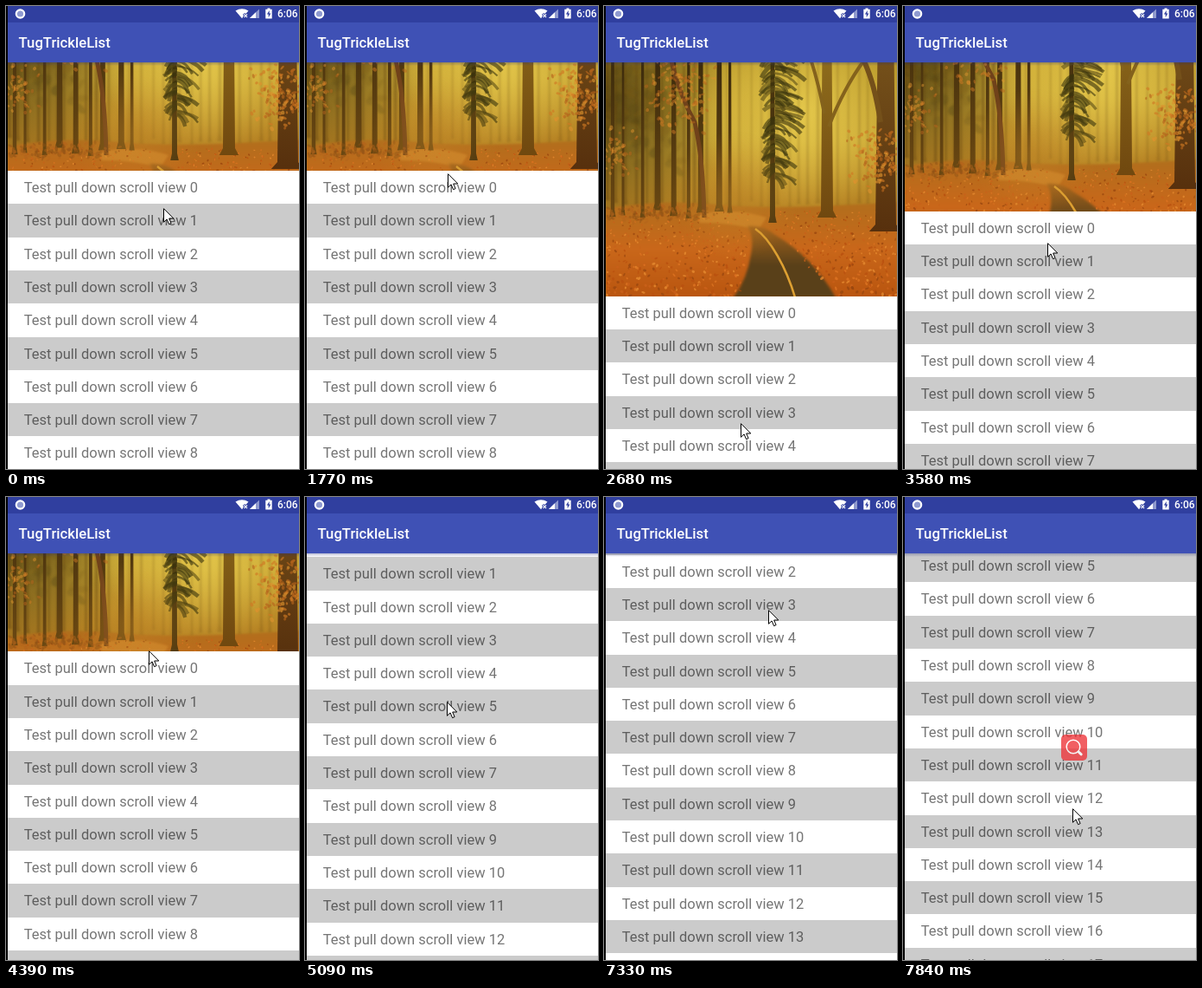
An HTML page with a canvas that plays this animation: 339 px wide and 534 px high, repeating every 7990 ms.

```html
<!DOCTYPE html>
<html lang="en">
<head>
<meta charset="utf-8">
<title>Pull down list</title>
<style>
  html, body { margin: 0; width: 100%; height: 100%; overflow: hidden; background: #000; }
  #stage { position: relative; width: 339px; height: 534px; overflow: hidden; background: #000; font-family: Roboto, "Noto Sans", sans-serif; }
  #page { position: absolute; left: 2px; top: 65px; width: 337px; height: 469px; overflow: hidden; background: #fff; }
  #header { position: absolute; left: 0; top: 0; width: 337px; overflow: hidden; }
  #photo { position: absolute; left: 0; top: 0; }
  #list { position: absolute; left: 0; width: 337px; background: #fff; }
  .row { position: absolute; left: 0; width: 318.3px; padding: 1px 0 0 18.7px; font-size: 16.5px; line-height: 38.3px; color: rgba(0,0,0,.54); white-space: pre; box-sizing: content-box; height: 37.3px; }
  .row:nth-child(even) { background: #cbcbcb; }
  #shade { position: absolute; left: 2px; top: 65px; width: 337px; height: 4px; background: linear-gradient(rgba(40,50,120,.32), rgba(40,50,120,0)); }
  #status { position: absolute; left: 2px; top: 0; width: 337px; height: 19px; background: #303f9f; }
  #bar { position: absolute; left: 2px; top: 19px; width: 337px; height: 46px; background: #3f51b5; color: #fff; font-size: 16.7px; font-weight: 500; line-height: 48px; text-indent: 12.5px; }
  #clock { position: absolute; left: 314px; top: 0; color: #fff; font-size: 12px; font-weight: 500; line-height: 19px; }
  svg { position: absolute; left: 0; top: 0; overflow: visible; }
</style>
</head>
<body>
<div id="stage">
  <div id="page">
    <div id="header"><canvas id="photo" width="337" height="272"></canvas></div>
    <div id="list"></div>
  </div>
  <div id="shade"></div>
  <div id="status"></div>
  <div id="bar">TugTrickleList</div>
  <svg width="339" height="19">
    <circle cx="16.5" cy="9" r="4.7" fill="#8f9ad0" stroke="#fff" stroke-width="2.2"/>
    <path d="M265.5 5.5Q273 .8 280.5 5.5L273 14.3Z" fill="#fff"/>
    <path d="M275 9l4.5 4.5M279.5 9l-4.5 4.5" stroke="#303f9f" stroke-width="3"/>
    <path d="M275.5 9.5l3.6 3.6M279.1 9.5l-3.6 3.6" stroke="#fff" stroke-width="1.1"/>
    <path d="M293 3.5V14H282Z" fill="#8f99cd"/>
    <path d="M289 7.3V14H282Z" fill="#fff"/>
    <path d="M302.5 2.5h3v1.3h2.2v10.7h-7.4V3.8h2.2Z" fill="#fff"/>
    <path d="M304.8 5l-2.9 4.6h1.8v3.6l2.7-4.7h-1.8Z" fill="#303f9f"/>
  </svg>
  <div id="clock">6:06</div>
  <svg id="popup" width="30" height="30">
    <rect width="30" height="30" rx="5" fill="#ee3338"/>
    <g fill="none" stroke="#fff" stroke-linecap="round">
      <circle cx="14" cy="14" r="7.8" stroke-width="1.5"/>
      <path d="M20.2 20l3 2.8" stroke-width="3"/>
    </g>
  </svg>
  <svg id="cursor" width="13" height="20">
    <path d="M.5 .7V16.3L4.1 12.9L6.6 18.7L9.1 17.6L6.7 12H11.8Z" fill="#fff" stroke="#000"/>
  </svg>
</div>
<script>
const $ = id => document.getElementById(id);
const LOOP = 7990, STEP = 133, LEAD = 15;
const REST = 125, PITCH = 38.3, ROWS = 22, PHOTO_W = 337, PHOTO_H = 272;

const flow = f => f;
const easeIn = f => f * f;
const easeOut = f => 1 - (1 - f) ** 3;
const easeBoth = f => f < .5 ? 4 * f ** 3 : 1 - 4 * (1 - f) ** 3;

// Each gesture ends at a step with the pointer at x, y.
// list: offset of the rows, positive when pulled and negative when scrolled.
const GESTURES = [
  { end: 0, x: 182, y: 233, list: 0, ease: flow },
  { end: 4, x: 220, y: 480, list: 0, ease: easeOut },
  { end: 8, x: 162, y: 327, list: 0, ease: flow },
  { end: 13, x: 165, y: 193, list: 0, ease: easeOut },
  { end: 20, x: 158, y: 481, list: 144.7, ease: easeBoth },
  { end: 22, x: 158, y: 482, list: 144.7, ease: flow },
  { end: 27, x: 167, y: 273, list: 46.8, ease: flow },
  { end: 32, x: 165, y: 188, list: 0, ease: easeOut },
  { end: 35, x: 165, y: 85, list: -105, ease: easeIn },
  { end: 38, x: 164, y: 236, list: -159.1, ease: easeOut },
  { end: 42, x: 164, y: 236, list: -159.1, ease: flow },
  { end: 45, x: 152, y: 448, list: 16, ease: flow },
  { end: 47, x: 152, y: 430, list: .3, ease: easeOut },
  { end: 48, x: 153, y: 460, list: 0, ease: flow },
  { end: 51, x: 165, y: 329, list: 0, ease: flow },
  { end: 55, x: 190, y: 130, list: -200, ease: flow },
  { end: 59, x: 196, y: 359, list: -321.4, ease: easeOut }
];

const POPUPS = [
  { from: 47, to: 49, x: 151, y: 376, alpha: .92 },
  { from: 59, to: 61, x: 183, y: 274, alpha: .78 }
];

function pose(step) {
  const i = GESTURES.findIndex(g => g.end >= step);
  if (i < 0) return GESTURES.at(-1);
  if (i === 0) return GESTURES[0];
  const a = GESTURES[i - 1], b = GESTURES[i];
  const f = b.ease((step - a.end) / (b.end - a.end));
  const mix = key => a[key] + (b[key] - a[key]) * f;
  return { x: mix('x'), y: mix('y'), list: mix('list') };
}

// A soft autumn wood: haze, trunks, one conifer, a road and fallen leaves.
function paintForest() {
  const c = $('photo').getContext('2d');
  let seed = 7;
  const rnd = (lo = 0, hi = 1) => {
    seed = seed * 16807 % 2147483647;
    return lo + (hi - lo) * seed / 2147483647;
  };

  function fade(top, bottom, colors) {
    const g = c.createLinearGradient(0, top, 0, bottom);
    colors.forEach((color, i) => g.addColorStop(i / (colors.length - 1), color));
    return g;
  }
  function glow(x, y, r, color) {
    const g = c.createRadialGradient(x, y, 0, x, y, r);
    g.addColorStop(0, color);
    g.addColorStop(1, color.slice(0, 7) + '00');
    c.fillStyle = g;
    c.fillRect(0, 0, PHOTO_W, PHOTO_H);
  }
  function fill(path, style) {
    c.fillStyle = style;
    c.fill(new Path2D(path));
  }
  function line(path, width, style) {
    c.strokeStyle = style;
    c.lineWidth = width;
    c.stroke(new Path2D(path));
  }
  function leaves(n, x, y, w, h, size, colors, alpha) {
    c.globalAlpha = alpha;
    for (let i = 0; i < n; i++) {
      c.fillStyle = colors[Math.floor(rnd(0, colors.length))];
      c.beginPath();
      // the sum of two draws thins the cloud toward its edge
      c.ellipse(x + w * (rnd() + rnd()) / 2, y + h * (rnd() + rnd()) / 2, rnd(.5, 1) * size, rnd(.3, .7) * size, rnd(0, 3), 0, 7);
      c.fill();
    }
    c.globalAlpha = 1;
  }
  function trunk(x, base, w, style) {
    fill(`M${x - w * .4} 0H${x + w * .4}L${x + w * .5} ${base - 8}L${x + w * .8} ${base}H${x - w * .8}L${x - w * .5} ${base - 8}Z`, style);
  }

  c.fillStyle = fade(0, 180, ['#b8982a', '#c9a534', '#b27b20']);
  c.fillRect(0, 0, PHOTO_W, PHOTO_H);
  glow(0, 50, 150, '#4a390ee0');
  glow(225, 60, 120, '#e8cc4ee8');
  glow(150, 60, 70, '#d6b53caa');

  // wood in the mist
  c.filter = 'blur(1px)';
  for (let x = 2; x < PHOTO_W; x += rnd(7, 15)) {
    c.globalAlpha = x < 130 ? .4 : .2;
    trunk(x, rnd(160, 176), rnd(1.5, 4), '#5f430f');
  }
  c.globalAlpha = 1;
  leaves(110, -30, -20, 130, 150, 9, ['#4d3e10', '#64501a', '#7b5a18'], .22);

  // ground
  fill('M0 170Q60 158 130 165T337 162V272H0Z', fade(160, 272, ['#b06f1d', '#c9671a', '#b9550f']));
  fill('M108 176Q150 168 186 180L176 195Q150 186 108 186Z', '#cb8028');
  c.filter = 'blur(1.5px)';
  fill('M164 190Q182 188 196 200Q240 226 266 272H148Q164 250 168 222Q172 202 164 190Z', fade(188, 235, ['#a8651c', '#594019']));
  c.filter = 'blur(.5px)';
  line('M173 193C190 204 209 238 219 272', 2.6, '#dda032');

  const litter = ['#dc7322', '#b9500f', '#9a470f', '#e58a30', '#c9601a'];
  for (let y = 172; y < PHOTO_H; y += 4) {
    const near = (y - 160) / 110;
    const bend = Math.max(0, y - 192);
    for (let i = 0; i < 36; i++) {
      const x = rnd(0, PHOTO_W);
      if (x > 165 - bend * .12 && x < 194 + bend * .92) continue;
      leaves(1, x, y, 4, 4, 1.2 + near * 1.5, litter, .8);
    }
  }

  // near trunks
  for (let x = 8; x < 160; x += rnd(12, 26))
    trunk(x, rnd(170, 182), rnd(3, 7), fade(0, 180, ['#3c2b0c', '#6b4812']));
  line('M76 0Q86 40 103 70Q113 115 114 180', 5, '#70421a');
  trunk(256, 180, 14, fade(0, 180, ['#8d6b1c', '#70480f']));
  line('M258 75Q276 30 298 0M253 60Q246 25 238 0', 4, '#84621c');
  trunk(324, 196, 24, fade(0, 196, ['#74501a', '#57300d']));
  line('M318 70Q311 25 299 0', 6, '#74501a');

  // conifer with drooping branches
  trunk(193, 186, 6, '#49340e');
  c.globalAlpha = .6;
  for (let y = -12; y < 135; y += 1.6) {
    const side = rnd() < .42 ? -1 : 1;
    const reach = rnd(10, side < 0 ? 20 : 38) * (1 - .25 * y / 135);
    line(`M196 ${y}q${side * reach * .6} 1 ${side * reach} ${rnd(6, 16)}`, rnd(2, 5), rnd() < .6 ? '#39330d' : '#5a4c16');
  }
  c.globalAlpha = 1;

  const gold = ['#cf7a24', '#b5641c', '#dc922e'];
  leaves(150, 45, -15, 85, 100, 3.2, gold, .5);
  leaves(60, -20, 70, 60, 70, 3, gold, .5);
  leaves(150, 275, 70, 85, 85, 3.2, gold, .65);
  leaves(150, -10, 164, 150, 22, 3, ['#8f5216', '#b4641c'], .45);
  glow(150, 155, 75, '#c68a2a66');
}

function buildList() {
  for (let i = 0; i < ROWS; i++) {
    const row = document.createElement('div');
    row.className = 'row';
    row.style.top = i * PITCH + 'px';
    row.textContent = 'Test pull down scroll view ' + i;
    $('list').append(row);
  }
  $('list').style.height = ROWS * PITCH + 'px';
}

const move = (id, x, y) => { $(id).style.transform = `translate(${Math.round(x)}px, ${Math.round(y)}px)`; };

function render(time) {
  const step = Math.floor((time % LOOP + LEAD) / STEP);
  const { x, y, list } = pose(step);
  const view = REST + Math.max(0, list);
  $('header').style.height = view + 'px';
  $('list').style.top = REST + list + 'px';
  move('photo', 0, (view - PHOTO_H) / 2);
  move('cursor', x, y);

  const popup = POPUPS.find(p => step >= p.from && step < p.to);
  $('popup').style.opacity = popup ? popup.alpha : 0;
  if (popup) move('popup', popup.x, popup.y);
}

paintForest();
buildList();
const began = performance.now();
function loop() {
  render(performance.now() - began);
  requestAnimationFrame(loop);
}
loop();
</script>
</body>
</html>
```
